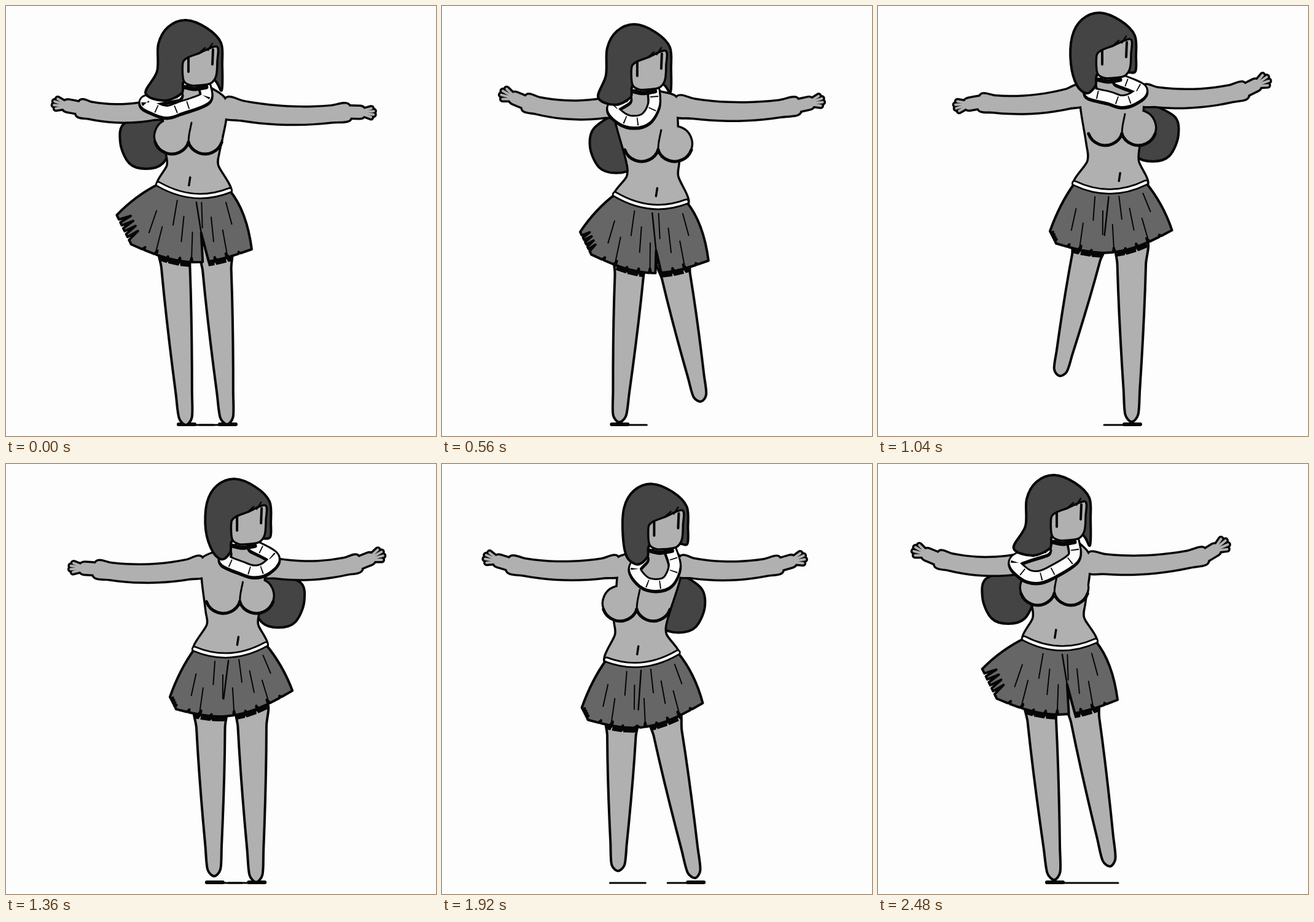
These frames come from a looping animation (700x700 px, 2560 ms). An HTML page with a canvas:

```html
<!DOCTYPE html>
<html lang="en">
<head>
<meta charset="utf-8">
<title>Dancer</title>
<style>
  html, body { margin: 0; width: 100%; height: 100%; overflow: hidden; background: #fdfdfd; }
  canvas { display: block; width: 700px; height: 700px; }
</style>
</head>
<body>
<canvas id="stage" width="700" height="700"></canvas>
<script>
const c = document.getElementById('stage').getContext('2d');
const LOOP = 2560, HALF = LOOP / 2, STEP = 80;
const INK = '#060606', SKIN = '#b0b0b0', HAIR = '#444', CLOTH = '#666', PAPER = '#fdfdfd';

// Joints at the key moments. hip holds x, y and tilt; hands and feet hold left then right;
// flow is how far the long hair swings sideways.
const steps = [
  { t: 0, head: [288, 130], neck: [307, 165], chest: [297, 226], hip: [306, 295, 10], lei: [262, 172],
    flow: [-79], hands: [77, 158, 600, 174], feet: [293, 682, 360, 681] },
  { t: 320, head: [289, 133], neck: [313, 167], chest: [306, 230], hip: [323, 302, -2], lei: [315, 187],
    flow: [-55], hands: [102, 97, 572, 130], feet: [289, 675, 381, 623] },
  { t: 720, head: [331, 139], neck: [354, 165], chest: [374, 240], hip: [360, 310, 12], lei: [347, 202],
    flow: [-44], hands: [120, 155, 641, 146], feet: [287, 672, 408, 677] },
  { t: 1040, head: [356, 118], neck: [381, 145], chest: [397, 212], hip: [378, 288, -1], lei: [397, 155],
    flow: [66], hands: [125, 164, 636, 118], feet: [295, 602, 413, 677] },
  { t: 1680, head: [366, 131], neck: [368, 157], chest: [353, 231], hip: [355, 309, -10], lei: [398, 174],
    flow: [47], hands: [103, 151, 622, 113], feet: [273, 611, 411, 683] },
  { t: 2160, head: [296, 116], neck: [306, 136], chest: [287, 212], hip: [302, 282, -16], lei: [335, 188],
    flow: [2], hands: [39, 114, 566, 101], feet: [291, 678, 417, 679] },
  { t: 2480, head: [282, 125], neck: [293, 160], chest: [287, 215], hip: [296, 286, 4], lei: [258, 184],
    flow: [-81], hands: [58, 138, 569, 127], feet: [287, 677, 378, 655] }
];

// Half a loop later every step returns mirrored.
function mirror(s) {
  const flip = ([x, y], axis) => [2 * axis - x, y];
  const swap = ([lx, ly, rx, ry]) => [700 - rx, ry, 700 - lx, ly];
  return {
    t: (s.t + HALF) % LOOP, head: flip(s.head, 328), neck: flip(s.neck, 340),
    chest: flip(s.chest, 340), hip: [...flip(s.hip, 338), -s.hip[2]], lei: flip(s.lei, 340),
    flow: [-s.flow[0]], hands: swap(s.hands), feet: swap(s.feet)
  };
}
const keys = [...steps, ...steps.map(mirror)].sort((a, b) => a.t - b.t);

const lerp = (a, b, k) => a + (b - a) * k;
const mix = (a, b, k) => [lerp(a[0], b[0], k), lerp(a[1], b[1], k)];
const add = (p, x, y) => [p[0] + x, p[1] + y];
const dist = (a, b) => Math.hypot(b[0] - a[0], b[1] - a[1]);

// Cubic Hermite through the keys, wrapped around the loop.
function poseAt(t) {
  const n = keys.length;
  const key = i => keys[(i + n) % n];
  const time = i => key(i).t + LOOP * Math.floor(i / n);
  let i = n - 1;
  while (keys[i].t > t) i--;
  const span = time(i + 1) - time(i), u = (t - time(i)) / span;
  const s = u * u * (3 - 2 * u), h0 = u * (1 - u) * (1 - u), h1 = u * u * (u - 1);
  const k0 = span / (time(i + 1) - time(i - 1)), k1 = span / (time(i + 2) - time(i));
  const pose = {};
  for (const part in keys[0]) {
    if (part === 't') continue;
    const [a, b, d, e] = [-1, 0, 1, 2].map(j => key(i + j)[part]);
    pose[part] = b.map((v, j) =>
      lerp(v, d[j], s) + h0 * k0 * (d[j] - a[j]) + h1 * k1 * (e[j] - v));
  }
  return pose;
}

// Adds a smooth curve through the points to the current path.
function trace(pts, closed) {
  const n = pts.length;
  const at = i => pts[closed ? (i + n) % n : Math.min(n - 1, Math.max(0, i))];
  c.moveTo(...pts[0]);
  for (let i = 0; i < (closed ? n : n - 1); i++) {
    const [a, b, d, e] = [at(i - 1), at(i), at(i + 1), at(i + 2)];
    const pull = (u, v) => Math.min(1 / 6, 0.38 * dist(b, d) / (dist(u, v) || 1));
    c.bezierCurveTo(...mix(b, add(b, d[0] - a[0], d[1] - a[1]), pull(a, d)),
      ...mix(d, add(d, b[0] - e[0], b[1] - e[1]), pull(b, e)), ...d);
  }
  if (closed) c.closePath();
}

function ink(width, color = INK) {
  c.lineWidth = width;
  c.strokeStyle = color;
  c.stroke();
}

function line(pts, width, color) {
  c.beginPath();
  trace(pts);
  ink(width, color);
}

function shape(pts, fill, width = 4) {
  c.beginPath();
  trace(pts, true);
  c.fillStyle = fill;
  c.fill();
  ink(width);
}

// Outline of a tapered limb along a quadratic curve.
function tube(a, ctrl, b, width, tip) {
  const left = [], right = [], n = 7;
  for (let i = 0; i <= n; i++) {
    const u = i / n, p = mix(a, ctrl, u), q = mix(ctrl, b, u), m = mix(p, q, u);
    const k = width(u) / 2 / dist(p, q), x = (q[1] - p[1]) * k, y = (p[0] - q[0]) * k;
    left.push(add(m, x, y));
    right.unshift(add(m, -x, -y));
  }
  return tip ? [...left, tip, ...right] : [...left, ...right];
}

function belt(p) {
  const [x, y, tilt] = p.hip;
  return { left: [x - 58, y - tilt / 2], right: [x + 58, y + tilt / 2], sag: [x, y + 28] };
}

function legs(p) {
  const { left, right } = belt(p), [lx, ly, rx, ry] = p.feet;
  const leg = (k, foot) => {
    const hip = add(mix(left, right, k), 0, 92), ankle = mix(foot, hip, 0.04);
    return tube(hip, mix(hip, ankle, 0.5), ankle, u => 48 - 27 * u ** 1.5, foot);
  };
  return [leg(0.8, [rx, ry]), leg(0.22, [lx, ly])];
}

function drawFloor(p) {
  const [lx, ly, rx, ry] = p.feet;
  for (const [x, y, side] of [[lx, ly, 1], [rx, ry, -1]]) {
    if (y < 645) continue;
    line([[x - 13 * side, 682], [x + 45 * side, 682]], 3);
    if (y > 670) line([[x - 12, 681], [x + 14, 681]], 6);
  }
}

function drawBackHair(p) {
  const flow = p.flow[0], x = p.neck[0] + flow, y = p.head[1] + 92;
  const r = 42 + 25 * Math.max(0, 1 - Math.abs(flow) / 50);
  shape([add(p.neck, -22, 0), [x - r * 0.8, y - 32], [x - r, y], [x - r * 0.65, y + 34], [x, y + 43],
    [x + r * 0.65, y + 34], [x + r, y], [x + r * 0.8, y - 32], add(p.neck, 22, 0)], HAIR);
}

// Arm, palm and four fingers; side is -1 for left, 1 for right.
function arm(p, side) {
  const tip = side < 0 ? p.hands.slice(0, 2) : p.hands.slice(2);
  const shoulder = add(p.neck, 49 * side, 0);
  const tilt = (5 + 0.8 * (p.neck[1] - tip[1])) * Math.PI / 180;
  const reach = (from, len, turn = 0) =>
    add(from, side * len * Math.cos(tilt + turn), -len * Math.sin(tilt + turn));
  const wrist = reach(tip, -42), knuckle = reach(wrist, 14);
  const parts = [
    { pts: tube(shoulder, add(mix(shoulder, wrist, 0.5), 0, 19), wrist, u => 30 - 6 * u) },
    { pts: [wrist, reach(wrist, 18)], width: 18 }
  ];
  const spread = 0.2 + 0.15 * Math.abs(tilt);
  for (let k = -1.5; k < 2; k++) {
    parts.push({ pts: [knuckle, reach(knuckle, 28 - 3 * Math.abs(k), k * spread)], width: 4 });
  }
  return parts;
}

function drawBody(p) {
  const { left, right } = belt(p), [hx, hy] = p.hip, [cx, cy] = p.chest, [fx, fy] = p.head;
  const waist = lerp(cx, hx, 0.75), bust = [cx - 27, cx + 27];
  const torso = [add(p.neck, -49, -13), add(p.neck, -50, 18), [waist - 42, cy + 12], [waist - 40, hy - 36],
    add(left, 3, 8), add(right, -3, 8), [waist + 40, hy - 36], [waist + 42, cy + 12],
    add(p.neck, 50, 18), add(p.neck, 49, -13), [fx + 42, fy + 2], [fx + 40, fy - 10], [fx + 10, fy - 10], [fx + 8, fy + 2]];
  const ring = x => Array.from({ length: 8 }, (_, i) =>
    [x + 27 * Math.cos(i * Math.PI / 4), cy - 14 + 27 * Math.sin(i * Math.PI / 4)]);
  const parts = [{ pts: torso }, ...bust.map(x => ({ pts: ring(x) })), ...arm(p, -1), ...arm(p, 1)];

  // All outlines first, then all fills, so the parts merge.
  for (const [grow, color] of [[7, INK], [0, SKIN]]) {
    for (const { pts, width } of parts) {
      c.beginPath();
      trace(pts, !width);
      c.fillStyle = color;
      if (!width) c.fill();
      if (width || grow) ink((width || 0) + grow, color);
    }
  }
  for (const x of bust) {
    c.beginPath();
    c.arc(x, cy - 14, 29, 0.35, Math.PI - 0.35);
    ink(5);
  }
  line([[cx + 5, cy - 36], [cx + 1, cy - 16], [cx, cy - 4]], 3);
  const nx = lerp(hx, cx, 0.8);
  line([[nx + 1, hy - 16], [nx - 1, hy - 3]], 3.5);
}

function drawSkirt(p, limbs) {
  const { left, right, sag } = belt(p), flow = p.flow[0];
  const pull = Math.min(0, flow), push = Math.max(0, flow);
  const tipL = add(left, -40 + 0.35 * pull, 78 + 0.35 * pull);
  const low = add(left, -30 + 0.18 * pull, 98);
  const tipR = add(right, 36 + 0.1 * push, 96 - 0.28 * push);
  const hem = u => add(mix(low, tipR, u), 0, 25 * Math.sin(Math.PI * u));
  const edge = u => mix(low, tipL, u);
  const cut = (at, u, w, depth) => {
    const e = at(u);
    return [at(u - w), mix(e, p.hip, depth / dist(e, p.hip)), at(u + w)];
  };
  const slit = { u: 0.5 - flow * 0.0015, depth: Math.max(0, 20 - 0.35 * flow), w: 0.025 };
  const cuts = [slit];
  for (let k = 1; k < 10; k++) {
    if (Math.abs(k / 10 - slit.u) > 0.06) cuts.push({ u: k / 10, depth: 3 + k % 3 * 2, w: 0.008 });
  }
  cuts.sort((a, b) => b.u - a.u);

  const border = [tipR, ...cuts.flatMap(({ u, w, depth }) => cut(hem, u, -w, depth)), low];
  for (let k = 1; k < 5; k++) border.push(...cut(edge, k / 5, 0.05, 4 - 0.2 * pull));
  border.push(tipL);

  const waistline = () => {
    c.moveTo(...left);
    c.quadraticCurveTo(...sag, ...right);
  };
  const outline = () => {
    c.beginPath();
    waistline();
    c.quadraticCurveTo(...add(right, 28, 34), ...tipR);
    border.forEach(e => c.lineTo(...e));
    c.quadraticCurveTo(...add(mix(tipL, left, 0.5), -4, -6), ...left);
  };

  // Shade the legs just below the hem.
  c.save();
  c.beginPath();
  limbs.forEach(leg => trace(leg, true));
  c.clip();
  c.translate(0, 8);
  outline();
  c.fillStyle = INK;
  c.fill();
  c.restore();

  outline();
  c.fillStyle = CLOTH;
  c.fill();
  ink(4);
  for (let k = 1; k < 10; k++) {
    const top = mix(left, right, k / 10), end = hem(k / 10), from = 0.2 + 0.2 * (k % 3);
    line([mix(top, end, from), mix(top, end, from + 0.34)], 2);
  }
  line([mix(hem(slit.u), p.hip, 0.25), mix(hem(slit.u), p.hip, 0.8)], 2.5);

  c.beginPath();
  waistline();
  ink(10);
  ink(4.5, PAPER);
}

function drawLei(p) {
  const [x, y] = p.lei, start = add(p.head, -10, 14), end = add(p.head, 36, 2);
  const ring = [start, [Math.min(start[0], x - 34), lerp(start[1], y, 0.4)], [x - 20, y - 6], [x, y],
    [x + 20, y - 6], [Math.max(end[0], x + 31), lerp(end[1], y, 0.45)], end];
  line(ring.map(q => add(q, 0, 2)), 23);
  line(ring, 22);
  line(ring, 16, PAPER);
  c.lineCap = 'butt';
  c.setLineDash([1.8, 19, 1.8, 31]);
  line(ring, 13);
  c.setLineDash([]);
  c.lineCap = 'round';
}

function drawHead(p) {
  const flow = p.flow[0], lock = -45 + 0.2 * flow;
  c.save();
  c.translate(...p.head);
  line([[3, 2], [18, 5], [38, 2]], 7);
  shape([[lock, 12], [-42, -24], [-40, -68], [-24, -96], [5, -107], [39, -94], [62, -70], [64, -35],
    [63, -3 - 0.13 * flow], [50, -10], [3, -8], [-2, 12], [lock / 2, 24]], HAIR);
  shape([[0, -38], [8, -46], [26, -53], [55, -64], [56, -40], [54, -16], [45, -4], [28, -1], [12, -1], [1, -9]], SKIN, 3.5);
  line([[9, -45], [9, -23]], 4);
  line([[49, -59], [48, -35]], 4);
  line([[26, -53], [36, -62]], 2.5);
  line([[41, -58], [48, -69]], 2.5);
  c.restore();
}

function draw(p) {
  const limbs = legs(p);
  c.fillStyle = PAPER;
  c.fillRect(0, 0, 700, 700);
  drawFloor(p);
  drawBackHair(p);
  limbs.forEach(leg => shape(leg, SKIN));
  drawBody(p);
  drawSkirt(p, limbs);
  drawLei(p);
  drawHead(p);
}

c.lineCap = c.lineJoin = 'round';
const start = performance.now();
function tick() {
  const t = Math.max(0, performance.now() - start) % LOOP;
  draw(poseAt(Math.floor(t / STEP) * STEP));
  requestAnimationFrame(tick);
}
tick();
</script>
</body>
</html>
```
